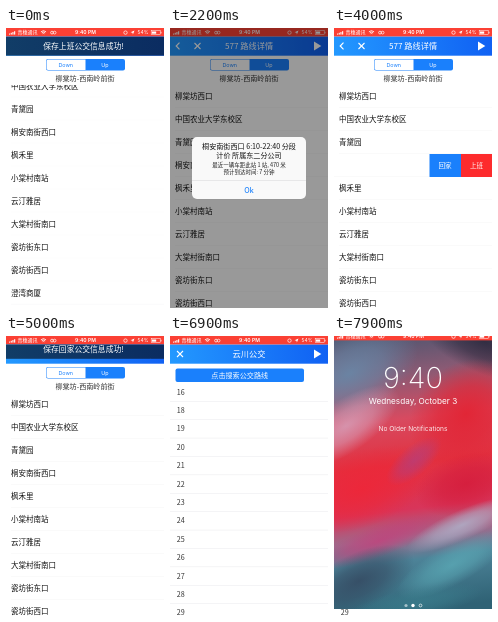
An HTML page with a canvas that plays this animation: 158 by 280 pixels, repeating every 8000 ms.

```html
<!DOCTYPE html>
<html lang="zh-CN">
<head>
<meta charset="utf-8">
<title>Bus lines</title>
<style>
html, body { margin: 0; width: 100%; height: 100%; overflow: hidden; background: #fff; }
canvas { display: block; width: 158px; height: 280px; }
</style>
</head>
<body>
<canvas id="stage"></canvas>
<script>
const W = 158, H = 280, LOOP = 8000, STEP = 100;
const BLUE = '#1a80fc', RED = '#fb4034';
const CJK = '"Noto Sans CJK SC", "Noto Sans CJK", sans-serif';
const LATIN = 'Inter, Roboto, sans-serif';
const STOPS = ['柳棠坊西口', '中国农业大学东校区', '青黛园', '桐安南街西口', '枫禾里', '小棠村南站',
  '云汀雅居', '大棠村街南口', '瓷坊街东口', '瓷坊街西口', '澄湾商厦'];
const LIST_TOP = 57, ROW = 23, SWIPED = 3;

const canvas = document.getElementById('stage');
const ctx = canvas.getContext('2d');
const dpr = window.devicePixelRatio || 1;
canvas.width = W * dpr;
canvas.height = H * dpr;

const clamp = v => Math.max(0, Math.min(1, v));
const easeOut = p => 1 - (1 - p) ** 2;
const easeInOut = p => p * p * (3 - 2 * p);
// Progress that already shows a first change at the start time.
const phase = (t, start, end) => clamp((t - start + STEP) / (end - start + STEP));

function rect(x, y, w, h, fill) {
  ctx.fillStyle = fill;
  ctx.fillRect(x, y, w, h);
}

function round(x, y, w, h, r, fill) {
  ctx.beginPath();
  ctx.roundRect(x, y, w, h, r);
  ctx.fillStyle = fill;
  ctx.fill();
}

function circle(x, y, r, fill) {
  ctx.beginPath();
  ctx.arc(x, y, r, 0, 7);
  ctx.fillStyle = fill;
  ctx.fill();
}

function line(points, color, width) {
  ctx.beginPath();
  points.forEach(([x, y]) => ctx.lineTo(x, y));
  ctx.strokeStyle = color;
  ctx.lineWidth = width;
  ctx.stroke();
}

function arc(x, y, r, from, to, color, width) {
  ctx.beginPath();
  ctx.arc(x, y, r, from, to);
  ctx.strokeStyle = color;
  ctx.lineWidth = width;
  ctx.stroke();
}

function poly(points, fill) {
  ctx.beginPath();
  points.forEach(([x, y]) => ctx.lineTo(x, y));
  ctx.fillStyle = fill;
  ctx.fill();
}

function text(str, x, y, size, color, { align = 'center', weight = 400, font = CJK } = {}) {
  ctx.font = `${weight} ${size}px ${font}`;
  ctx.textAlign = align;
  ctx.textBaseline = 'alphabetic';
  ctx.fillStyle = color;
  ctx.fillText(str, x, y + size * 0.37);
}

function clipped(x, y, w, h, draw) {
  ctx.save();
  ctx.beginPath();
  ctx.rect(x, y, w, h);
  ctx.clip();
  draw();
  ctx.restore();
}

function shifted(x, y, draw) {
  ctx.save();
  ctx.translate(x, y);
  draw();
  ctx.restore();
}

function faded(alpha, draw) {
  ctx.save();
  ctx.globalAlpha *= alpha;
  draw();
  ctx.restore();
}

function statusBar() {
  rect(0, 0, W, 8.4, RED);
  for (let i = 0; i < 4; i++) rect(3 + i * 1.7, 5.6 - i * 0.8, 1.1, 1 + i * 0.8, '#fff');
  text('青穗通讯', 11.5, 4.5, 5, '#fff', { align: 'left' });
  for (const r of [1.3, 2.6, 3.9]) arc(37.5, 6.7, r, -2.3, -0.85, '#fff', 0.8);
  arc(46, 4.6, 1.4, 0, 7, '#fff', 0.7);
  arc(48.6, 4.6, 1.4, 0, 7, '#fff', 0.7);
  text('9:40 PM', 79.5, 4.5, 5.1, '#fff', { weight: 600, font: LATIN });
  arc(119.5, 4.6, 1.7, 0, 7, '#fff', 0.7);
  poly([[128.5, 2.5], [126.9, 6.5], [126.5, 4.7], [124.6, 4.3]], '#fff');
  text('54%', 137, 4.6, 4.9, '#fff', { font: LATIN });
  ctx.strokeStyle = '#fff';
  ctx.lineWidth = 0.5;
  ctx.strokeRect(145.2, 2.7, 9, 3.8);
  rect(146, 3.5, 4.2, 2.2, '#fff');
  rect(154.7, 3.8, 0.7, 1.6, '#fff');
}

function cross(x, y) {
  line([[x - 3, y - 3], [x + 3, y + 3]], '#fff', 1.1);
  line([[x + 3, y - 3], [x - 3, y + 3]], '#fff', 1.1);
}

function navBar(title, { back = false, spin = -1 } = {}) {
  const g = ctx.createLinearGradient(0, 28, W, 8);
  g.addColorStop(0, '#2399ff');
  g.addColorStop(1, '#1060f3');
  rect(0, 8.4, W, 19.3, g);
  if (back) {
    line([[9.5, 14.6], [6.2, 18], [9.5, 21.4]], '#fff', 1.2);
    cross(27.5, 18);
  } else cross(10, 18);
  text(title, 79, 18, 8.2, '#fff', { weight: 500 });
  if (spin < 0) poly([[144, 13.6], [151.3, 18], [144, 22.4]], '#fff');
  else arc(146, 18, 3.6, spin, spin + 4.6, '#57a4ff', 1);
}

function segments() {
  rect(0, 27.7, W, LIST_TOP - 27.7, '#fff');
  round(40, 31, 79, 11.4, 2, BLUE);
  round(40.5, 31.5, 39, 10.4, [1.6, 0, 0, 1.6], '#fff');
  text('Down', 59.7, 36.8, 5.4, BLUE, { font: LATIN });
  text('Up', 99, 36.8, 5.4, '#fff', { font: LATIN });
  text('柳棠坊-西南岭前街', 79, 50.7, 7.1, '#333');
}

function stopRow(i, y, fill) {
  rect(0, y, W, ROW, fill);
  rect(5, y + ROW - 0.4, W - 5, 0.4, '#f1f1f3');
  text(STOPS[i], 5, y + 11.5, 7.5, '#111', { align: 'left' });
}

function linePage({ scroll, bar, swipe, pressed }) {
  rect(0, 27.7, W, H, '#fff');
  clipped(0, LIST_TOP, W, H - LIST_TOP, () => {
    STOPS.forEach((_, i) => {
      const y = LIST_TOP + i * ROW - scroll;
      if (i !== SWIPED || !swipe) {
        stopRow(i, y, i === SWIPED && pressed ? '#f4f4f7' : '#fff');
        return;
      }
      rect(95.5, y, 31.5, ROW, BLUE);
      rect(127, y, 31, ROW, '#fd2b2d');
      text('回家', 111, y + 11.5, 6.6, '#fff');
      text('上班', 142.5, y + 11.5, 6.6, '#fff');
      shifted(-swipe, 0, () => stopRow(i, y, '#fff'));
    });
    if (bar) round(155.2, 59 + scroll * 0.4, 1.3, 84, 0.6, 'rgba(0,0,0,.35)');
  });
  segments();
}

function searchPage() {
  rect(0, 27.7, W, H, '#fff');
  round(5.5, 32.5, 128.5, 13.6, 2, BLUE);
  text('点击搜索公交路线', 69.7, 39.5, 7.1, '#fff');
  for (let i = 0; i < 13; i++) {
    const y = 56 + i * 18.4;
    text(i ? 17 + i : 16, 6.8, y, 7.2, '#333', { align: 'left' });
    rect(0, y + 9, W, 0.5, '#e9e9ec');
  }
}

function alertBox(alpha) {
  if (!alpha) return;
  rect(0, 0, W, H, `rgba(0,0,0,${0.4 * alpha})`);
  faded(alpha, () => {
    round(22, 109, 114, 62, 5, '#f9f9f9');
    text('桐安南街西口 6:10-22:40 分段', 79, 118, 7.1, '#111', { weight: 500 });
    text('计价 所属东二分公司', 79, 127, 7.1, '#111', { weight: 500 });
    text('最近一辆车距此站 1 站, 470 米', 79, 136.5, 5.5, '#222');
    text('预计到达时间: 7 分钟', 79, 143.7, 5.5, '#222');
    rect(22, 152.3, 114, 0.4, '#c9c9cd');
    text('Ok', 79, 162, 7.1, BLUE, { font: LATIN, weight: 500 });
  });
}

function toast(msg, shown) {
  if (!shown) return;
  clipped(0, 8.4, W, 19.4, () => shifted(0, -20 * (1 - shown), () => {
    const g = ctx.createLinearGradient(0, 0, W, 0);
    g.addColorStop(0, '#113d67');
    g.addColorStop(1, '#0b2c61');
    rect(0, 8.4, W, 19.4, g);
    text(msg, 77.5, 18.4, 7.8, '#fff', { weight: 500 });
  }));
}

function blob(x, y, rx, ry, angle, rgb, alpha) {
  ctx.save();
  ctx.translate(x, y);
  ctx.rotate(angle);
  ctx.scale(rx, ry);
  const g = ctx.createRadialGradient(0, 0, 0, 0, 0, 1);
  g.addColorStop(0, `rgba(${rgb},${alpha})`);
  g.addColorStop(0.5, `rgba(${rgb},${alpha * 0.65})`);
  g.addColorStop(1, `rgba(${rgb},0)`);
  circle(0, 0, 1, g);
  ctx.restore();
}

function wallpaper() {
  const g = ctx.createLinearGradient(60, 0, 95, H);
  [[0, '#49556f'], [0.16, '#8a5a74'], [0.32, '#d84a60'], [0.48, '#e2303f'], [0.64, '#d8355a'],
    [0.74, '#9c6c8d'], [0.82, '#4d8398'], [1, '#2f6275']].forEach(([p, c]) => g.addColorStop(p, c));
  rect(0, 0, W, H, g);
  blob(15, 45, 75, 42, -0.5, '104,136,168', 0.9);
  blob(150, 12, 70, 32, 0.4, '40,38,58', 0.85);
  blob(12, 97, 62, 26, -0.6, '214,164,190', 0.8);
  blob(132, 85, 62, 50, -0.7, '226,36,52', 0.95);
  blob(28, 160, 75, 38, -0.35, '238,38,56', 0.9);
  blob(80, 132, 34, 15, -0.7, '176,64,130', 0.7);
  blob(132, 155, 52, 30, -0.3, '212,26,58', 0.8);
  blob(45, 212, 70, 16, -0.35, '196,62,122', 0.75);
  blob(128, 196, 60, 15, -0.42, '176,182,206', 0.8);
  blob(25, 252, 60, 28, -0.45, '52,72,96', 0.85);
  blob(118, 236, 62, 20, -0.5, '92,172,184', 0.75);
  blob(80, 275, 70, 16, -0.2, '60,132,146', 0.6);
}

function lockScreen(bottom) {
  if (!bottom) return;
  clipped(0, 0, W, bottom, () => {
    shifted(0, bottom - H, () => {
      wallpaper();
      text('9:40', 79, 48, 29, '#fff', { weight: 200, font: LATIN });
      text('Wednesday, October 3', 79, 72, 8.2, '#fff', { font: LATIN });
      text('No Older Notifications', 79, 100, 6.6, 'rgba(255,255,255,.88)', { font: LATIN });
      circle(72, 276.5, 1.6, 'rgba(255,255,255,.55)');
      circle(79, 276.5, 1.7, '#fff');
      arc(86.5, 276.5, 1.4, 0, 7, 'rgba(255,255,255,.75)', 0.9);
    });
  });
  clipped(0, 0, W, 8.4, () => shifted(0, -4 * bottom / 273, statusBar));
}

function swipeAt(t) {
  if (t < 3400 || t >= 4800) return 0;
  if (t < 4400) return 63 * easeInOut(phase(t, 3400, 4000));
  return 63 * (1 - easeOut(phase(t, 4400, 4800)));
}

function alertAt(t) {
  if (t < 1900 || t >= 2900) return 0;
  if (t < 2600) return easeOut(phase(t, 1900, 2200));
  return 1 - easeInOut(phase(t, 2600, 2900)) ** 0.7 * 0.85;
}

function pushAt(t) {
  if (t < 6100) return 0;
  const p = phase(t, 6100, 6600);
  return W * (p < 0.2 ? 0.095 : 1 - (1 - p) ** 2 * 1.02);
}

function draw(t) {
  ctx.setTransform(dpr, 0, 0, dpr, 0, 0);
  rect(0, 0, W, H, '#fff');
  const push = pushAt(t), p = push / W;

  if (push) {
    shifted(-0.3 * (W - push), 0, searchPage);
    rect(0, 27.7, W, H, `rgba(0,0,0,${0.1 * (1 - p)})`);
  }
  if (p < 1) {
    if (push) {
      const g = ctx.createLinearGradient(push - 4, 0, push, 0);
      g.addColorStop(0, 'rgba(0,0,0,0)');
      g.addColorStop(1, 'rgba(0,0,0,.12)');
      rect(push - 4, 27.7, 4, H, g);
    }
    shifted(push, 0, () => linePage({
      scroll: t < 800 ? 33.7 : 33.7 * (1 - easeInOut(phase(t, 800, 1400))),
      bar: t >= 800 && t < 1400,
      swipe: swipeAt(t),
      pressed: t >= 1700 && t < 2000
    }));
  }

  if (p < 1) navBar('577 路线详情', { back: true, spin: t >= 1700 && t < 2000 ? t / 100 : -1 });
  else navBar('云川公交');
  statusBar();

  if (t < 200) toast('保存上班公交信息成功!', t < 100 ? 1 : 0.5);
  if (t >= 4900) {
    const shown = t < 6800 ? easeOut(phase(t, 4900, 5200)) : t < 6900 ? 0.5 : 0;
    toast('保存回家公交信息成功!', shown);
  }
  alertBox(alertAt(t));
  lockScreen(t < 7500 ? 0 : 273 * easeInOut(phase(t, 7500, 7900)));
}

const start = performance.now();
function tick() {
  const t = Math.max(0, performance.now() - start) % LOOP;
  draw(Math.floor(t / STEP) * STEP);
  requestAnimationFrame(tick);
}
tick();
</script>
</body>
</html>
```
